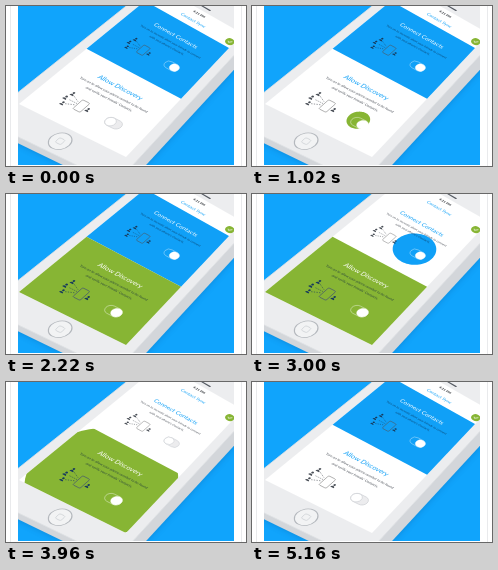
An HTML page with a canvas for the animation above (5220 ms loop, 240 by 160 pixels).

```html
<!DOCTYPE html>
<html lang="en">
<head>
<meta charset="utf-8">
<title>Contact Sync toggles</title>
<style>
  html, body { margin: 0; width: 100%; height: 100%; overflow: hidden; background: #fff; }
  canvas { display: block; width: 240px; height: 160px; }
</style>
</head>
<body>
<canvas id="stage"></canvas>
<script>
const canvas = document.getElementById('stage');
const ctx = canvas.getContext('2d');
const dpr = window.devicePixelRatio || 1;
canvas.width = 240 * dpr;
canvas.height = 160 * dpr;

const LOOP = 5220;
const SKY = '#10a4fc', BLUE = '#10a0f7', GREEN = '#87b534', INK = '#4a4f57';
const FONT = 'Lato, "Open Sans", sans-serif';

// Corners of the phone's content area
const TL = [139, -5], TR = [223, 42], BR = [120, 151], BL = [13, 98];
const ASPECT = 1.55;  // height of the area when its width is 1
const SPLIT = 0.514;  // border between the two panels
const REACH = 66;     // radius that covers a panel from its centre

const project = (() => {
  const sx = TL[0] - TR[0] + BR[0] - BL[0], sy = TL[1] - TR[1] + BR[1] - BL[1];
  const ax = TR[0] - BR[0], ay = TR[1] - BR[1];
  const bx = BL[0] - BR[0], by = BL[1] - BR[1];
  const den = ax * by - bx * ay;
  const g = (sx * by - bx * sy) / den, h = (ax * sy - sx * ay) / den;
  return (u, v) => [0, 1].map(i =>
    (TL[i] + (TR[i] * (1 + g) - TL[i]) * u + (BL[i] * (1 + h) - TL[i]) * v) / (1 + g * u + h * v));
})();

const panels = [
  {
    color: BLUE, top: 0, bottom: SPLIT,
    title: 'Connect Contacts',
    lines: ['Turn on to securely allow your friends to connect', 'with your phone’s Contacts.'],
    initial: 1, changes: [[2760, 530, 0], [4600, 500, 1]]
  },
  {
    color: GREEN, top: SPLIT, bottom: 1,
    title: 'Allow Discovery',
    lines: ['Turn on to allow your phone number to be found', 'and verify your friends’ Contacts.'],
    initial: 0, changes: [[835, 500, 1], [3935, 500, 0]]
  }
];

const mix = (a, b, k) => a + (b - a) * k;

function trace(points) {
  ctx.beginPath();
  points.forEach(p => ctx.lineTo(p[0], p[1]));
  ctx.closePath();
}

function arc(u, v, r, from, to) {
  const pts = [], steps = Math.ceil((to - from) * 12);
  for (let i = 0; i <= steps; i++) {
    const a = mix(from, to, i / steps);
    pts.push(project(u + r * Math.cos(a) / 100, v + r * Math.sin(a) / 100 / ASPECT));
  }
  return pts;
}

function traceRect(u0, v0, u1, v1) {
  trace([[u0, v0], [u1, v0], [u1, v1], [u0, v1]].map(p => project(...p)));
}

function traceRound(u0, v0, u1, v1, r) {
  const q = Math.PI / 2, du = r / 100, dv = du / ASPECT;
  trace([
    ...arc(u1 - du, v1 - dv, r, 0, q),
    ...arc(u0 + du, v1 - dv, r, q, 2 * q),
    ...arc(u0 + du, v0 + dv, r, 2 * q, 3 * q),
    ...arc(u1 - du, v0 + dv, r, 3 * q, 4 * q)
  ]);
}

// Draw in local units (100 = panel width) lying on the phone's surface
function at(u, v, draw) {
  const p = project(u, v), a = project(u + 0.01, v), b = project(u, v + 0.01 / ASPECT);
  ctx.save();
  ctx.transform(a[0] - p[0], a[1] - p[1], b[0] - p[0], b[1] - p[1], p[0], p[1]);
  draw();
  ctx.restore();
}

function label(str, u, v, size, color, weight = 400) {
  at(u, v, () => {
    ctx.font = `${weight} ${size}px ${FONT}`;
    ctx.textAlign = 'center';
    ctx.textBaseline = 'middle';
    ctx.fillStyle = color;
    ctx.fillText(str, 0, 0);
  });
}

function pill(x, y, w, h, r) {
  ctx.beginPath();
  ctx.roundRect(x, y, w, h, r);
}

function disc(x, y, r) {
  ctx.beginPath();
  ctx.arc(x, y, r, 0, Math.PI * 2);
}

function person(x, y) {
  disc(x, y - 1.4, 1);
  ctx.fill();
  ctx.beginPath();
  ctx.arc(x, y + 1.7, 1.7, Math.PI, 0);
  ctx.fill();
}

function icon(u, v, ink, line) {
  at(u, v, () => {
    ctx.fillStyle = ink;
    ctx.strokeStyle = line;
    ctx.lineWidth = 0.6;
    pill(2, -5.5, 7, 11.5, 1.1);
    ctx.stroke();
    ctx.strokeStyle = ink;
    ctx.lineWidth = 0.45;
    ctx.setLineDash([1, 1]);
    ctx.beginPath();
    for (const y of [-5, 0, 5]) {
      ctx.moveTo(-6, y);
      ctx.lineTo(1, y * 0.35);
    }
    ctx.stroke();
    person(-8, -6);
    person(-10, 0);
    person(-8, 6);
    person(12, 1);
  });
}

function content(p, on) {
  const body = on ? 'rgba(12,34,62,.72)' : INK;
  label(p.title, 0.5, p.top + 0.124, 6.3, on ? '#fff' : BLUE);
  p.lines.forEach((t, i) => label(t, 0.508, p.top + 0.184 + i * 0.038, 3.2, body));
  icon(0.325, p.top + 0.335, on ? '#173a5c' : INK, on ? '#4a5c6c' : '#999');
}

const toggleSpot = p => [0.7, p.top + 0.341];

function toggle(p, on) {
  at(...toggleSpot(p), () => {
    ctx.lineWidth = 0.6;
    ctx.strokeStyle = on > 0.5 ? 'rgba(255,255,255,.55)' : '#cfd2d6';
    pill(-7.5, -4.6, 15, 9.2, 4.6);
    if (on < 0.5) {
      ctx.fillStyle = '#ececee';
      ctx.fill();
    }
    ctx.stroke();
    disc(mix(-3, 2.9, on), 0, 4.5);
    ctx.fillStyle = '#fff';
    ctx.fill();
    ctx.stroke();
  });
}

// 0 = off, 1 = on, fractions while the colour spreads or retreats
function level(p, t) {
  let value = p.initial;
  for (const [start, length, to] of p.changes) {
    if (t < start) break;
    const k = Math.min(1, (t - start) / length);
    value = to ? k : 1 - k;
  }
  return value;
}

function drawPanel(p, t) {
  const k = level(p, t), spread = k * k;
  content(p, false);
  if (k > 0) {
    ctx.save();
    traceRect(0, p.top, 1, p.bottom);
    ctx.clip();
    if (k < 1) {
      // the circle drifts from the switch to the panel's centre as it grows
      const [u, v] = toggleSpot(p);
      const cu = mix(u, 0.5, spread), cv = mix(v, (p.top + p.bottom) / 2, spread);
      trace(arc(cu, cv, REACH * spread, 0, Math.PI * 2));
      ctx.clip();
    }
    traceRect(-0.1, p.top - 0.1, 1.1, p.bottom + 0.1);
    ctx.fillStyle = p.color;
    ctx.fill();
    content(p, true);
    ctx.restore();
  }
  toggle(p, Math.min(1, k / 0.3));
}

function traceBody() {
  traceRound(-0.085, -0.5, 1.095, 1.16, 16);
}

function drawPhone() {
  ctx.save();
  ctx.translate(5, 9);
  traceBody();
  ctx.shadowColor = 'rgba(0,50,110,.25)';
  ctx.shadowBlur = 6 * dpr;
  ctx.fillStyle = '#d3d6da';
  ctx.fill();
  ctx.restore();

  traceBody();
  ctx.fillStyle = '#ecedef';
  ctx.fill();
  ctx.strokeStyle = '#e0e2e5';
  ctx.lineWidth = 0.8;
  ctx.stroke();

  traceRect(0, -0.165, 1, 1);
  ctx.fillStyle = '#fff';
  ctx.fill();

  at(0.5, -0.2, () => {
    pill(-6, -0.8, 12, 1.6, 0.8);
    ctx.fillStyle = '#555b63';
    ctx.fill();
  });
  at(0.485, 1.083, () => {
    disc(0, 0, 8.2);
    ctx.fillStyle = '#f2f3f4';
    ctx.fill();
    ctx.strokeStyle = '#b4b8bd';
    ctx.lineWidth = 0.8;
    ctx.stroke();
    pill(-2.6, -2.6, 5.2, 5.2, 1.3);
    ctx.strokeStyle = '#cfd2d6';
    ctx.lineWidth = 0.6;
    ctx.stroke();
  });

  label('4:21 PM', 0.5, -0.125, 3.7, '#22262b', 700);
  label('Contact Sync', 0.505, -0.054, 5, BLUE);
  at(0.957, -0.05, () => {
    disc(0, 0, 4.8);
    ctx.fillStyle = GREEN;
    ctx.fill();
    ctx.strokeStyle = '#fff';
    ctx.lineWidth = 0.7;
    ctx.beginPath();
    ctx.moveTo(-2, 0);
    ctx.lineTo(-0.5, 1.6);
    ctx.lineTo(2.2, -1.6);
    ctx.stroke();
  });
}

function draw(t) {
  ctx.setTransform(dpr, 0, 0, dpr, 0, 0);
  ctx.fillStyle = '#fff';
  ctx.fillRect(0, 0, 240, 160);
  ctx.fillStyle = '#e9eaec';
  ctx.fillRect(4, 0, 1, 160);
  ctx.fillRect(235, 0, 1, 160);

  ctx.save();
  ctx.beginPath();
  ctx.rect(12, 0, 216, 159);
  ctx.clip();
  ctx.fillStyle = SKY;
  ctx.fillRect(0, 0, 240, 160);
  drawPhone();
  panels.forEach(p => drawPanel(p, t));
  ctx.restore();
}

const begin = performance.now();
function tick() {
  draw((performance.now() - begin) % LOOP);
  requestAnimationFrame(tick);
}
tick();
</script>
</body>
</html>
```
